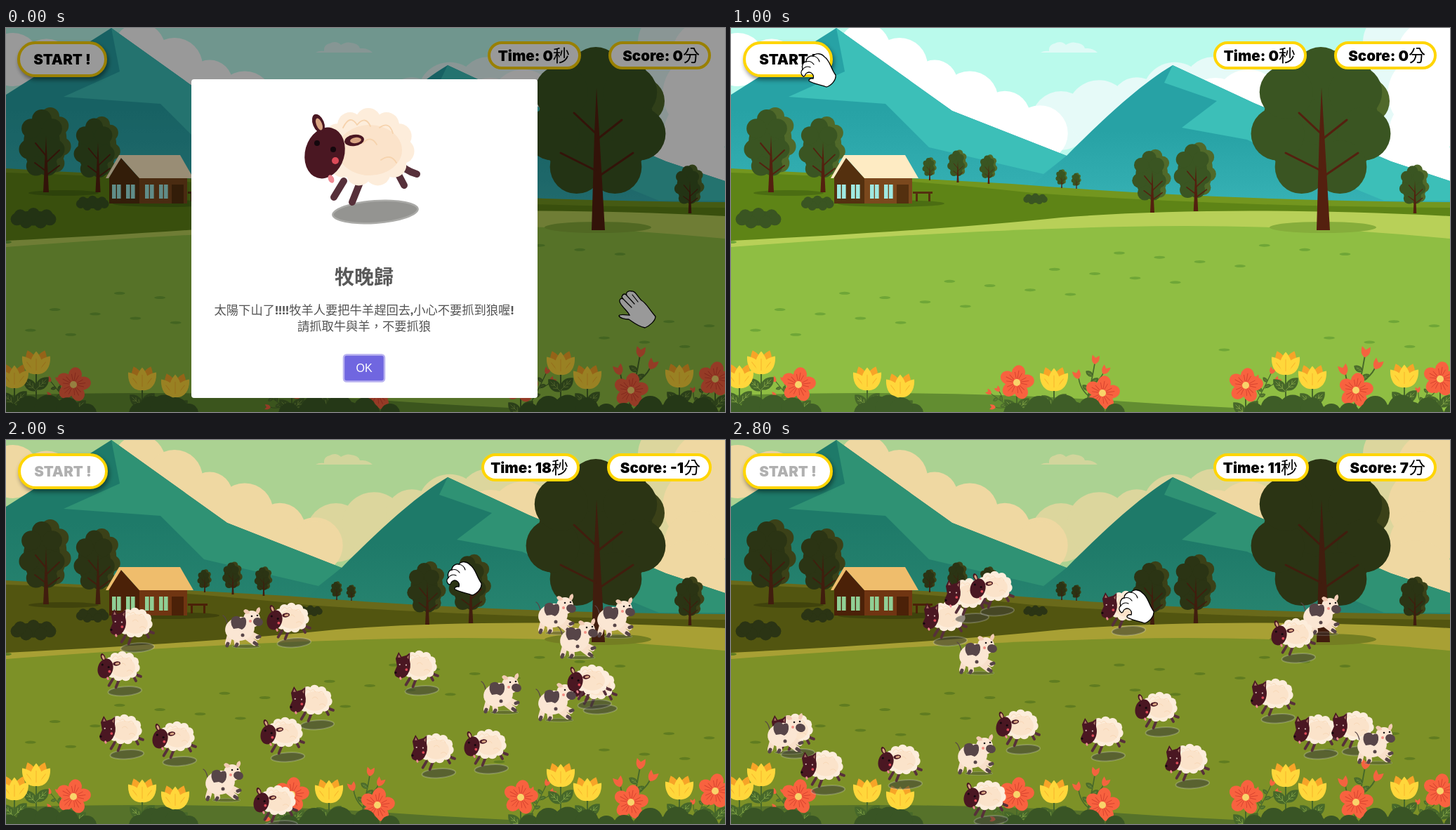
Animation, 1024 px wide and 547 px high, one loop 3 s. Source, as an HTML page:

```html
<!DOCTYPE html>
<html lang="zh-Hant">
<head>
<meta charset="utf-8">
<title>牧晚歸</title>
<style>
html, body { margin: 0; width: 100%; height: 100%; overflow: hidden; }
svg { display: block; width: 100%; height: 100%; }
#stage {
  --sky: #bafaec; --cloud: #fff; --pale: #e6faf8; --puff: #dffaf6;
  --peak: #3cbfb8; --slope: #27a2a5; --foot: #38b3b6;
  --far: #73961f; --hill: #5e8416; --hillShade: #4b6d12; --band: #b8d058; --grass: #8fbe43; --mark: #6fa637;
  --ring: #86ad3b; --edge: #628d31; --tree: #3a5522; --treeBack: #50692a; --trunk: #54200f;
  --roof: #feebc3; --wall: #7b481d; --gable: #54300f; --glass: #9fe9e2; --bush: #3e5d27; --start: #000;
}
#stage.dusk {
  --sky: #abd292; --cloud: #efd8a2; --pale: #dcd69d; --puff: #d2d59c;
  --peak: #2f9274; --slope: #1e7a69; --foot: #288570;
  --far: #69691a; --hill: #525510; --hillShade: #40430c; --band: #a8a034; --grass: #7d9127; --mark: #607c20;
  --ring: #747e22; --edge: #56722a; --tree: #2b3414; --treeBack: #3b4118; --trunk: #411d0e;
  --roof: #efbd6c; --wall: #703512; --gable: #4b2108; --glass: #90cf95; --bush: #395525; --start: #b0b0b0;
}
.heavy { font: 900 20.5px Inter, sans-serif; }
.unit { font: 100 24px "Noto Sans CJK TC", "Noto Sans CJK", sans-serif; }
.note { font: 300 17.3px Lato, "Noto Sans CJK TC", "Noto Sans CJK", sans-serif; fill: #545454; }
.note tspan { font-weight: 900; }
.title { font: 700 28px "Noto Sans CJK TC", "Noto Sans CJK", sans-serif; fill: #595959; }
.ok { font: 16px "Liberation Sans", Arial, sans-serif; fill: #fff; }
.mid { text-anchor: middle; }
.lift { filter: drop-shadow(2px 4px 3px rgba(0, 0, 0, .45)); }
</style>
</head>
<body>
<svg id="stage" viewBox="0 0 1024 547"></svg>
<script>
const stage = document.getElementById('stage');

// Short lists are written as "a,b,c a,b,c".
const each = (list, fn) => list.split(' ').map(item => fn(...item.split(',').map(Number))).join('');
const repeat = (n, fn) => Array.from({ length: n }, (_, i) => fn(i)).join('');
const path = (d, fill, extra = '') => `<path d="${d}" fill="${fill}" ${extra}/>`;
const line = (d, color, width) => path(d, 'none', `stroke="${color}" stroke-width="${width}" stroke-linecap="round" stroke-linejoin="round"`);
const oval = (x, y, rx, ry, fill, turn = 0, extra = '') =>
  `<ellipse cx="${x}" cy="${y}" rx="${rx}" ry="${ry}" fill="${fill}" transform="rotate(${turn} ${x} ${y})" ${extra}/>`;
const dot = (x, y, r, fill) => oval(x, y, r, r, fill);
const box = (x, y, w, h, fill, extra = '') => `<rect x="${x}" y="${y}" width="${w}" height="${h}" fill="${fill}" ${extra}/>`;
const put = (id, x, y, scale = 1, turn = 0) =>
  `<use href="#${id}" transform="translate(${x} ${y}) rotate(${turn}) scale(${scale})"/>`;
const part = (id, body) => `<g id="${id}">${body}</g>`;

// A rounded mass: an ellipse with n bumps of radius r on its rim.
const lobes = (x, y, rx, ry, n, r, fill) => oval(x, y, rx + r / 2, ry + r / 2, fill) + repeat(n, i => {
  const a = i / n * 2 * Math.PI - Math.PI / 2;
  return dot(x + rx * Math.cos(a), y + ry * Math.sin(a), r, fill);
});
// n puffs of varying size along a line.
const puffs = (fill, x1, y1, x2, y2, n, r) => repeat(n, i => {
  const k = i / (n - 1);
  return dot(x1 + (x2 - x1) * k, y1 + (y2 - y1) * k, r * (1 + .12 * Math.sin(i * 2.4)), fill);
});

const ink = '#4a1722';
const leg = '#57303a';
const green = '#47682a';
const patch = '#574548';
const wool =
  oval(102, 150, 62, 17, 'rgba(60,60,55,.55)', -4, 'stroke="rgba(255,255,255,.2)" stroke-width="5"') +
  line('M134 79Q144 91 161 96M134 95L143 112', leg, 10) +
  line('M57 106L43 129M79 111L69 136', leg, 10) +
  lobes(92, 58, 48, 38, 11, 18, '#fdeddb') + oval(94, 62, 46, 36, '#fbe3ca') +
  line('M56 30Q66 10 76 26Q88 12 95 28M108 30Q122 20 127 38M84 52Q96 40 104 54M110 76Q124 66 132 80', '#f6d3ad', 1.8);

const defs = `<defs>
  <linearGradient id="slopeFill" x1="0" y1="0" x2="0" y2="1">
    <stop offset=".45" stop-color="var(--slope)"/><stop offset="1" stop-color="var(--foot)"/>
  </linearGradient>` +
  part('tree',
    lobes(6, -73, 17, 35, 7, 13, 'var(--treeBack)') + lobes(-6, -69, 19, 35, 7, 14, 'var(--tree)') +
    path('M-4 0L0 -80L4 0z', 'var(--trunk)') +
    line('M0 -52L-15 -70M0 -42L19 -60M0 -24L19 -38M0 -30L-16 -42', 'var(--trunk)', 2)) +
  part('shrub', lobes(35, 16, 24, 6, 7, 9, 'var(--tree)')) +
  part('spike', path('M0 0C-13 -8 -11 -24 0 -36C11 -24 13 -8 0 0z', '#ffd73b') + line('M0 -6V-24', '#f7b62e', 1.2)) +
  part('glow', path('M0 0C-13 -8 -11 -24 0 -36C11 -24 13 -8 0 0z', '#f7a428')) +
  part('tulip',
    put('glow', 0, 18, 1, -20) + put('glow', 0, 18, 1, 20) +
    put('spike', 0, 18, .9, -38) + put('spike', 0, 18, .9, 38) + put('spike', 0, 18, .9)) +
  part('petal', oval(0, -14, 9.5, 11, '#f8623f') + line('M0 -5V-17M-2 -6L-5 -14M2 -6L5 -14', '#d6422f', .9)) +
  part('bloom', repeat(5, i => put('petal', 0, 0, 1, 10 + 72 * i)) + dot(0, 0, 5, '#f9d36a')) +
  part('leaf', path('M0 0C-10 -6 -9 -18 0 -25C9 -18 10 -6 0 0z', green) +
    line('M0 0V-20M-4 -11L0 -6L4 -11M-3 -16L0 -12L3 -16', '#84a446', .8)) +
  part('bud', path('M0 0C-7 -4 -5 -10 -5 -13L0 -9L5 -13C6 -8 6 -3 0 0z', '#f4633f')) +
  part('sprig',
    line('M0 0Q8 -30 13 -60M4 -14Q-8 -24 -10 -40M9 -30Q20 -36 25 -46', green, 1.6) +
    repeat(4, i => put('leaf', 3 + i * 2.5, -12 - i * 10, .5, i % 2 ? -55 : 55)) +
    put('bud', 13, -59, 1, 8) + put('bud', -10, -38, 1, -20) + put('bud', 25, -45, 1, 28)) +
  part('sheep', wool +
    oval(30, 66, 28, 37, ink, 16) +
    oval(21, 24, 8, 14, ink, -22) + oval(22, 25, 4, 9, '#d9a583', -22) +
    oval(72, 48, 14, 8, ink, -8) + oval(74, 48, 8, 4, '#d9a583', -8) +
    dot(19, 52, 4, '#14080d') + dot(42, 61, 4, '#14080d') + dot(45, 77, 5, '#dc4a58') +
    oval(39, 103, 4, 6, '#f08a94', -25)) +
  part('wolf', wool +
    path('M5 32L16 8L27 25L45 20L58 10L57 39Q65 67 49 91Q35 109 17 103Q-2 99 1 80L10 60z', ink) +
    path('M13 28L17 16L23 28zM47 27L54 19L53 35z', '#a87266') +
    dot(20, 54, 3, '#d8bcb6') + dot(44, 56, 3, '#d8bcb6') + dot(5, 84, 4, '#14080d') + dot(45, 73, 5, '#dc4a58') +
    oval(23, 105, 4, 6, '#f08a94', -20)) +
  part('cow',
    oval(33, 56, 20, 2.5, 'rgba(60,60,55,.4)', 0, 'stroke="rgba(255,255,255,.2)"') +
    line('M6 23Q4 14 0 12', patch, 1.3) +
    line('M10 40L7 51M19 43L20 52M33 42L45 51M39 38L49 43', '#f8dfca', 8) +
    line('M7 52L6 55M20 53L19 55M45 51L48 53M49 43L52 42', patch, 5) +
    oval(24, 31, 21, 17, '#fbe6d3', -10) + dot(41, 17, 12, '#fbe6d3') +
    path('M13 15Q21 10 25 16Q32 12 33 19Q34 28 27 32L22 30L15 31Q9 23 13 15z', patch) + dot(28, 40, 2.5, patch) +
    path('M33 10Q26 5 32 3Q38 4 38 9zM47 8Q47 1 52 0Q55 5 50 10z', '#f2cbb4') +
    oval(50, 21, 7, 6, patch, 12) + dot(41, 13, 1.3, '#1d1518') + dot(49, 12, 1.3, '#1d1518') + dot(39, 20, 2, '#f28f84')) +
  part('grab',
    path('M4 33C0 30 0 26 3 23C1 18 4 12 8 12C8 6 14 3 18 4C22 -1 30 0 34 5C42 10 43 22 50 31C51 38 44 46 37 48C28 45 18 43 13 40C10 38 14 35 18 36C20 30 14 25 9 28C5 30 8 33 4 33z', '#fff', 'stroke="#000" stroke-width="1.3"') +
    line('M3 23Q8 17 14 20M8 12Q15 10 19 16M18 4Q25 5 27 12', '#000', 1.2)) +
  part('open',
    path('M19 1C24 0 27 8 33 14C40 18 42 24 53 37C53 43 45 50 38 53C30 52 22 46 15 41C9 41 2 39 1 36C2 33 10 35 16 35C14 30 6 24 3 18C0 13 4 10 7 12L5 9C7 3 11 5 12 7C10 2 15 0 19 1z', '#fff', 'stroke="#000" stroke-width="1.3"') +
    line('M7 12L19 24M12 7L23 19M20 6L28 16', '#000', 1.2)) +
  '</defs>';

const sky =
  box(0, 0, 1024, 547, 'var(--sky)') +
  puffs('var(--pale)', 470, 132, 740, 70, 6, 42) + puffs('var(--pale)', 945, 20, 965, 120, 3, 45) +
  puffs('var(--cloud)', 10, 45, 440, 150, 10, 38) + puffs('var(--cloud)', 190, 30, 440, 150, 6, 37) +
  puffs('var(--cloud)', 690, 115, 830, 90, 4, 44) + puffs('var(--cloud)', 1000, 40, 975, 200, 4, 52) +
  path('M441 35Q446 32 453 33Q452 24 461 22Q470 17 477 24Q485 19 491 21Q502 22 504 29Q515 28 522 35z', 'var(--puff)');

const hills =
  path('M0 95L150 0L315 118L478 182L500 260H0z', 'url(#slopeFill)') +
  path('M150 0L162 62L82 98L220 108L282 170L445 208L478 182L315 118z', 'var(--peak)') +
  path('M410 240L478 182C515 145 575 85 629 53L745 107L940 190L1024 218V262H410z', 'url(#slopeFill)') +
  path('M629 53L617 78L692 104L642 142L735 159L830 205L930 246H1024V218L940 190L745 107z', 'var(--peak)') +
  path('M0 200Q140 208 400 222Q700 246 1024 248V310H0z', 'var(--far)') +
  path('M0 206Q220 212 430 235Q700 254 1024 256V310H0z', 'var(--hill)') +
  oval(82, 235, 50, 4, 'var(--hillShade)') + oval(228, 250, 76, 5, 'var(--hillShade)') +
  path('M0 303Q300 288 470 270Q700 252 1024 268V320H0z', 'var(--band)') +
  path('M0 312Q320 288 560 283Q800 278 1024 300V547H0z', 'var(--grass)') +
  oval(843, 284, 76, 8, 'var(--ring)');

const marks = repeat(32, i => oval(i * .618 % 1 * 1024, 305 + i * .37 % 1 * 155, 8, 2, 'var(--mark)'));

// Trees are given by foot and height.
const trees =
  each('57,234,122 131,234,109 283,217,33 323,220,47 367,222,42 471,228,27 492,229,23 600,263,91 662,261,99 974,264,70',
    (x, y, h) => put('tree', x, y, h / 122)) +
  put('shrub', 4, 255) + put('shrub', 98, 238, .72) + put('shrub', 415, 235, .53) +
  dot(870, 75, 44, 'var(--treeBack)') + dot(905, 104, 33, 'var(--treeBack)') +
  lobes(840, 135, 63, 70, 7, 38, 'var(--tree)') +
  path('M834 288L838 150L841 85L845 150L853 288z', 'var(--trunk)') +
  line('M842 152L809 121M844 157L877 131M846 210L893 178M840 203L790 178', 'var(--trunk)', 3);

const house =
  path('M163 184L190 214V250H147V213z', 'var(--gable)') + box(190, 213, 68, 37, 'var(--wall)') +
  path('M161 181H248L267 214H190L164 185L146 214H142z', 'var(--roof)') +
  each('151 171 198 218', x => box(x, 223, 5.6, 20, 'var(--glass)') + box(x + 7, 223, 5.6, 20, 'var(--glass)')) +
  box(236, 223, 17, 27, 'var(--gable)') +
  path('M259 233H287V236H284V247H281V236H266V247H263V236H259z', 'var(--gable)');

const stalk = (x, y) => line(`M${x} ${y}V547`, green, 2) +
  put('leaf', x, y + 42, 1, -45) + put('leaf', x, y + 40, 1, 45);
const plant = (id, list) => each(list, stalk) + each(list, (x, y) => put(id, x, y));
const thicket = (x, w) => puffs('var(--bush)', x - w, 549, x + w, 549, 6, 15) + puffs('var(--bush)', x - w / 2, 542, x + w / 2, 542, 3, 18);

const flowers =
  path('M0 523Q300 514 560 532T1024 545V547H0z', 'var(--edge)') +
  each('88,535,.65,-50 402,545,.65,-65 505,538,1,0 748,533,.75,15 887,540,1.2,0 980,545,.65,12', (...at) => put('sprig', ...at)) +
  plant('tulip', '43,475 12,495 194,498 241,508 460,499 790,476 828,496 959,494') +
  plant('bloom', '96,508 407,505 529,520 733,509 890,516 1010,500') +
  each('60,55 225,35 475,72 800,55 955,75', thicket);

const frame = (x1, x2, h, cls = '') =>
  box(x1 + 2, 21, x2 - x1 - 4, h - 4, '#fff', `rx="${h / 2 - 2}" stroke="#ffd500" stroke-width="4" class="${cls}"`);
const pill = (x1, x2, label, unit) => frame(x1, x2, 40) +
  `<text x="${x2 - 16}" y="47" class="heavy" text-anchor="end">${label}<tspan class="unit" dy="1">${unit}</tspan></text>`;

const dialog =
  box(0, 0, 1024, 547, 'rgba(0,0,0,.4)') +
  box(264, 73, 493, 454, '#fff', 'rx="4"') + put('sheep', 424, 112) +
  `<text x="510" y="365" class="title mid">牧晚歸</text>
  <text x="510" y="408" class="note mid">太陽下山了<tspan>!!!!</tspan>牧羊人要把牛羊趕回去<tspan>,</tspan>小心不要抓到狼喔<tspan>!</tspan></text>
  <text x="510" y="431" class="note mid">請抓取牛與羊，不要抓狼</text>` +
  box(481, 465.5, 58, 38, '#7066e0', 'rx="4" stroke="#b9b3f0" stroke-width="2.5"') +
  '<text x="510" y="490" class="ok mid">OK</text>';

const states = [
  { at: 0, shift: -1, time: [687, 820, 0], score: [859, 0], hand: [872, 374], dialog: true },
  { at: 1000, time: [687, 820, 0], score: [859, 0], hand: [99, 36] },
  { at: 1500, time: [677, 820, 26], score: [859, 0], hand: [671, 349], herd: {
    wolf: '672,168 903,351',
    cow: '286,267 439,312',
    sheep: '608,308 427,492' } },
  { at: 2000, time: [677, 817, 18], score: [856, -1], hand: [627, 173], herd: {
    wolf: '148,238 133,390 404,348 553,299 577,417 807,326',
    cow: '309,238 677,332 755,219 839,224 786,254 755,343 281,457',
    sheep: '371,231 130,300 208,400 362,394 652,411 799,319 352,491' } },
  { at: 2500, time: [687, 823, 11], score: [862, 7], hand: [552, 213], herd: {
    wolf: '273,229 304,196 527,214 740,339 498,393 618,432 56,389 99,441 801,390 855,385',
    cow: '322,276 812,220 320,419 49,389 889,404',
    sheep: '340,186 769,253 575,358 377,383 209,433 331,484' } }
];

stage.innerHTML = defs + sky + hills + marks + trees + house + flowers + '<g id="live"></g>';
const live = document.getElementById('live');
let shown;

function show({ shift = 0, time, score, hand, herd, dialog: asking }) {
  const [left, right, seconds] = time;
  const [scoreLeft, points] = score;
  stage.classList.toggle('dusk', !!herd);
  live.innerHTML =
    `<g transform="translate(${shift} 0)">` +
    frame(17, 145, 51, 'lift') + '<text x="81" y="52" class="heavy mid" fill="var(--start)">START !</text>' +
    pill(left, right, `Time: ${seconds}`, '秒') + pill(scoreLeft, 1005, `Score: ${points}`, '分') + '</g>' +
    Object.entries(herd || {}).map(([kind, spots]) =>
      each(spots, (x, y) => put(kind, x, y, kind === 'cow' ? 1 : .385))).join('') +
    put(asking ? 'open' : 'grab', ...hand) + (asking ? dialog : '');
}

function tick() {
  const t = performance.now() % 3000;
  const state = states.findLast(s => s.at <= t);
  if (state !== shown) show(shown = state);
  requestAnimationFrame(tick);
}
tick();
</script>
</body>
</html>
```
